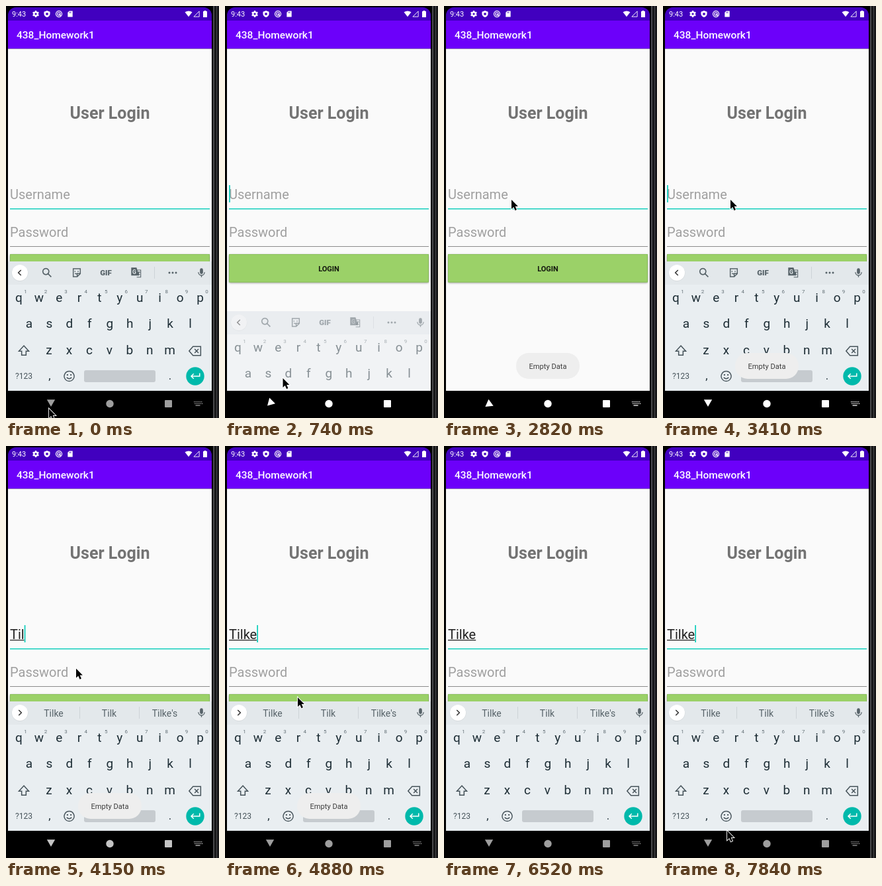
Write an HTML page with a canvas that moves like this. It is 322 by 621 pixels and loops after 7.99 s.

```html
<!DOCTYPE html>
<html lang="en">
<head>
<meta charset="utf-8">
<title>Login screen</title>
<style>
html, body { margin: 0; width: 100%; height: 100%; overflow: hidden; background: #000; }
canvas { display: block; }
</style>
</head>
<body>
<canvas width="322" height="621"></canvas>
<script>
const ctx = document.querySelector('canvas').getContext('2d');
const LOOP = 7990, STEP = 148, LAST = 53;
const NAME = 'Tilke', GUESSES = [NAME, 'Tilk', NAME + "'s"];
const TEAL = '#16cfbd', KEY = '#1d2d35', SOFT_KEY = '#46535a', TOOL = '#566268';

// Pointer path: [step, x, y]
const POINTER = [[0, 65, 607], [4, 65, 607], [6, 110, 515], [8, 188, 412], [9, 194, 404], [12, 194, 404],
  [16, 108, 300], [17, 102, 292], [25, 102, 292], [31, 110, 379], [33, 110, 379], [35, 170, 386], [37, 307, 402]];
const POINTER_BACK = [[45, 254, 508], [46, 254, 508], [48, 150, 570], [50, 66, 604], [51, 59, 599], [52, 59, 599], [53, 97, 580]];

function track(keys, n) {
  const i = keys.findIndex(k => k[0] >= n);
  if (i < 0) return keys[keys.length - 1].slice(1);
  if (i === 0) return keys[0].slice(1);
  const a = keys[i - 1], b = keys[i], f = (n - a[0]) / (b[0] - a[0]);
  return a.slice(1).map((v, j) => v + (b[j + 1] - v) * f);
}

function rect(x, y, w, h, color, r = 0) {
  ctx.fillStyle = color;
  ctx.beginPath();
  ctx.roundRect(x, y, w, h, r);
  ctx.fill();
}

function disc(x, y, r, color) {
  ctx.fillStyle = color;
  ctx.beginPath();
  ctx.arc(x, y, r, 0, 7);
  ctx.fill();
}

function text(str, x, y, size, color, weight = 400, align = 'left') {
  ctx.font = `${weight} ${size}px Roboto, sans-serif`;
  ctx.fillStyle = color;
  ctx.textAlign = align;
  ctx.fillText(str, x, y);
}

// Icons are drawn in a 24 unit box centred on x, y
function icon(path, x, y, size, color, line = 0, turn = 0) {
  const p = new Path2D(path);
  ctx.save();
  ctx.translate(x, y);
  ctx.rotate(turn * Math.PI / 180);
  ctx.scale(size / 24, size / 24);
  ctx.translate(-12, -12);
  ctx.fillStyle = ctx.strokeStyle = color;
  ctx.lineWidth = line;
  if (line) ctx.stroke(p); else ctx.fill(p, 'evenodd');
  ctx.restore();
}

function drawStatusBar() {
  rect(3, 2, 308, 40, '#4100bf', [12, 12, 0, 0]);
  rect(3, 22, 308, 42.5, '#6c00fa');
  const white = '#fff';
  text('9:43', 9, 16, 11, white);
  icon('M12 6a6 6 0 1 0 .1 0', 45, 12, 11, white, 5);
  icon('M12 1v4M12 19v4M2.5 6.5l3.5 2M18 15.5l3.5 2M21.5 6.5l-3.5 2M6 15.5l-3.5 2', 45, 12, 11, white, 5);
  icon('M12 1l10 4v7c0 5-4 9-10 11C6 21 2 17 2 12V5zM12 7l-5 5 5 5 5-5z', 62, 12, 11, white);
  icon('M12 2a10 10 0 1 0 .1 0M12 7a5 5 0 1 0 .1 0M12 12l6 6', 80, 12, 11, white, 2.5);
  icon('M9 2h11v20H4V7zM9 5v4h2V5zM13 5v4h2V5z', 97, 12, 11, white);
  icon('M0 6Q12-2 24 6L12 21z', 276, 12, 11, white);
  icon('M3 21L21 3v18z', 288, 12, 11, white, 2);
  icon('M9 2h6v2h3v18H6V4h3z', 301, 12, 12, white);
  text('438_Homework1', 16, 49, 15.5, white, 500);
}

function drawForm(n) {
  rect(3, 64.5, 308, 516, '#fafafa');
  text('User Login', 157, 169.7, 25, '#737373', 700, 'center');

  const typed = NAME.slice(0, [24, 26, 28, 29, 31].filter(s => n >= s).length);
  let caretX = 6;
  if (typed) {
    text(typed, 6, 291, 20, '#212121');
    const width = ctx.measureText(typed).width;
    rect(6, 292, width, 1.2, '#212121');
    caretX += width;
  } else {
    text('Username', 6, 291, 20, '#a0a0a0');
  }
  rect(6, 305, 302, 1.6, TEAL);
  const blink = Math.floor((n - (n < 24 ? 2 : 51)) / 3.38) % 2 === 0;
  if (blink || (n >= 24 && n < 31)) rect(caretX, 270, 1.8, 26, TEAL);

  text('Password', 6, 348, 20, '#a0a0a0');
  rect(6, 362, 302, 1, '#8b8b8b');

  const pressed = n >= 9 && n < 14;
  ctx.save();
  ctx.shadowColor = 'rgba(0,0,0,.4)';
  ctx.shadowBlur = pressed ? 5 : 3;
  ctx.shadowOffsetY = 1;
  rect(6, 374, 302, 42.5, '#9bd168', 2);
  ctx.restore();
  if (pressed) {
    const [x, radius, alpha] = track([[9, 182, 75, .09], [10, 170.5, 131.5, .09], [11, 157, 170, .09], [14, 157, 170, 0]], n);
    ctx.save();
    ctx.beginPath();
    ctx.roundRect(6, 374, 302, 42.5, 2);
    ctx.clip();
    disc(x, 396, radius, `rgba(0,0,0,${alpha})`);
    ctx.restore();
  }
  ctx.strokeStyle = '#8bc05c';
  ctx.lineWidth = 1;
  ctx.strokeRect(6.5, 374.5, 301, 41.5);
  text('LOGIN', 157, 400, 11, '#14180f', 700, 'center');
}

function drawToolbar(n) {
  const suggesting = n >= 25;
  rect(3, 385, 308, 35, '#e3e8eb');
  disc(21, 402.5, 12.5, 'rgba(0,0,0,.06)');
  disc(21, 402, 12, '#fff');
  icon(suggesting ? 'M9 5l7 7-7 7' : 'M15 5l-7 7 7 7', 21, 402, 14, '#333', 2.6);
  if (suggesting) {
    GUESSES.forEach((word, i) => text(word, 72 + i * 84, 408, 14, TOOL, 400, 'center'));
    rect(111, 393, 1, 18, '#cdd3d7');
    rect(201, 393, 1, 18, '#cdd3d7');
  } else {
    icon('M9.5 3a6.5 6.5 0 1 0 .1 0M14.5 14.5l6.5 6.5', 62, 402, 17, TOOL, 2.4);
    icon('M4 3h16v11l-7 7H4zM20 14h-7v7M8 8v2M15 8v2M8 13q3 3 6 0', 107, 402, 16, TOOL, 2.2);
    text('GIF', 151, 406, 11.5, TOOL, 900, 'center');
    icon('M2 2h12l6 18H2z', 196, 401, 16, TOOL);
    icon('M14 6h8v16h-9M15 11h6M18 9v2q-1 5-4 6M16 13l4 4', 197, 402, 16, TOOL, 1.6);
    text('G', 194, 404, 8.5, '#e3e8eb', 700, 'center');
    rect(224, 393, 1, 18, '#cdd3d7');
    for (let i = -1; i < 2; i++) disc(252 + i * 5, 402, 1.5, TOOL);
  }
  icon('M8.5 5.5a3.5 3.5 0 0 1 7 0v6a3.5 3.5 0 0 1-7 0z', 295.5, 402, 16, TOOL);
  icon('M5 11a7 7 0 0 0 14 0M12 18v4', 295.5, 402, 16, TOOL, 2);
}

function drawKeyboard(n) {
  const [drop, alpha] = track([[4, 0, 1], [6, 150, 0], [19, 150, 0], [21, 0, 1]], n);
  if (!alpha) return;
  ctx.save();
  ctx.beginPath();
  ctx.rect(3, 65, 308, 516);
  ctx.clip();
  ctx.globalAlpha = alpha;
  ctx.translate(0, drop);
  rect(3, 385, 308, 196, '#e9eef1');
  drawToolbar(n);

  [['qwertyuiop', 19.5, 446], ['asdfghjkl', 35, 485], ['zxcvbnm', 65, 525]].forEach(([keys, x0, y], row) => {
    [...keys].forEach((key, i) => {
      const x = x0 + i * 30.45;
      text(key, x, y, 19, KEY, 400, 'center');
      if (!row) text((i + 1) % 10, x + 10, 433, 8, '#657178', 400, 'center');
    });
  });
  icon('M12 3l9 10h-5v7H8v-7H3z', 27, 519.5, 20, SOFT_KEY, 1.8);
  icon('M8 4h14v16H8l-7-8zM11 8.5l7 7M18 8.5l-7 7', 286, 520, 20, SOFT_KEY, 1.8);
  text('?123', 27, 562, 12, SOFT_KEY, 400, 'center');
  text(',', 66, 563, 17, KEY, 400, 'center');
  icon('M12 2a10 10 0 1 0 .1 0M7 14.5q5 5 10 0', 95.5, 558, 18, SOFT_KEY, 1.9);
  icon('M8.5 8v2.5M15.5 8v2.5', 95.5, 558, 18, SOFT_KEY, 2.6);
  rect(118, 549, 108, 18, '#c6cbcf', 3);
  text('.', 248, 563, 17, KEY, 400, 'center');
  disc(286, 558, 13.7, '#00b9ab');
  icon('M21 6v6H4M9 7l-5 5 5 5', 286, 558, 18, '#fff', 2);
  ctx.restore();
}

function drawToast(n) {
  const [alpha] = track([[15, 0], [16, .25], [18, 1], [33, 1], [36, 0]], n);
  ctx.save();
  ctx.globalAlpha = alpha;
  rect(109, 523, 96, 39, '#eeeeee', 19);
  text('Empty Data', 157, 547, 11.1, '#3c3c3c', 400, 'center');
  ctx.restore();
}

function drawNavBar(n) {
  rect(3, 580, 308, 39, '#000', [0, 0, 9, 9]);
  const [shade] = track([[2, 158], [4, 255], [25, 255], [30, 158]], n);
  const color = `rgb(${shade},${shade},${shade})`;
  const [turn] = track([[4, 270], [6, 360], [18, 360], [19, 444], [21, 630]], n);
  icon('M2 12L21 1v22z', 68, 598.4, 13.5, color, 0, turn);
  disc(157, 599.5, 5.7, color);
  rect(240, 594, 11, 11, color, 1);
  if (n < 5 || n > 17) {
    for (let i = 0; i < 12; i++) rect(285 + i % 6 * 2.2 - (i > 5 ? 0 : 1), 596 + (i > 5 ? 2.7 : 0), 1.3, 1.3, color);
    rect(286.5, 601.4, 7, 1.3, color);
  }
}

function drawWindow() {
  for (let spread = 30, alpha = .06; spread > 0; spread -= 5, alpha += .008) {
    rect(222 - spread, 101 - spread, 200, 245 + spread * 2, `rgba(0,0,0,${alpha})`, spread + 4);
  }
  rect(221, 85, 120, 247, '#15191b', 6);
  rect(222, 86, 120, 245, '#30373a', 5);
  rect(222, 86, 120, 21, '#394043', [5, 0, 0, 0]);
  rect(222, 107, 120, 1, '#1f2426');
  disc(274, 160, 28.5, '#f2f0f6');
}

function drawPointer(n) {
  if (n > 37 && n < 45) return;
  const [x, y] = track(n < 45 ? POINTER : POINTER_BACK, n);
  ctx.save();
  ctx.translate(x, y);
  ctx.scale(.9, .9);
  const arrow = new Path2D('M0 0V15.5L3.6 12.2 6.2 18 8.8 16.8 6.3 11.2H11z');
  ctx.strokeStyle = '#fff';
  ctx.lineWidth = 2;
  ctx.stroke(arrow);
  ctx.fillStyle = '#000';
  ctx.fill(arrow);
  ctx.restore();
}

function draw(now) {
  const n = Math.min(LAST, Math.floor((now % LOOP + 8) / STEP));
  rect(0, 0, 322, 621, '#000');
  rect(313, 0, 2, 621, '#48484a');
  rect(315, 0, 7, 621, '#171718');
  rect(318, 0, 1, 621, '#48484a');
  drawStatusBar();
  drawForm(n);
  drawKeyboard(n);
  drawToast(n);
  drawNavBar(n);
  if (n === 41) drawWindow();
  drawPointer(n);
}

const start = performance.now();
function tick() {
  draw(performance.now() - start);
  requestAnimationFrame(tick);
}
tick();
</script>
</body>
</html>
```
